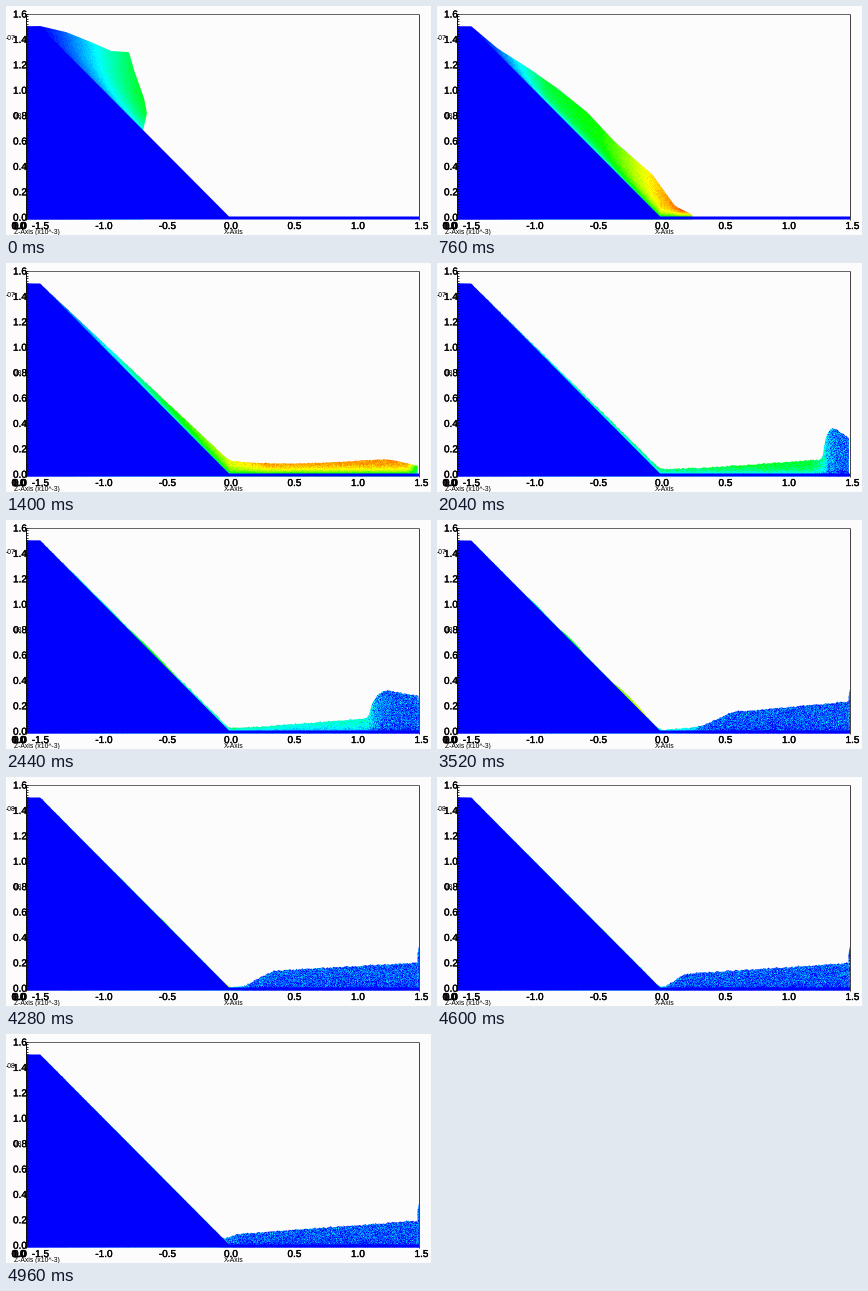
A matplotlib script that plays this animation: 425 px wide and 229 px high, repeating every 5000 ms.

```python
import numpy as np
import matplotlib.pyplot as plt
from matplotlib.animation import FuncAnimation
from matplotlib.colors import LinearSegmentedColormap
from matplotlib.path import Path
from matplotlib.patheffects import withStroke

W, H, DPI = 425, 229, 100
FRAMES, STEP = 125, 40
LEFT, RIGHT, TOP, FLOOR, BASE = 20, 413.5, 7.5, 210.5, 213.5
CREST, TOE, WALL = 34, 223, 413
SLIDE, HIT = .76, 1.36  # the front reaches the floor, then the right wall

# Surface at the start and at the end of the slide.
heap = np.array([(34, 20), (60, 26), (85, 36), (105, 45), (123, 46),
                 (128, 64), (138, 92), (141, 107), (137, 125)], float)
spill = np.array([(34, 20), (60, 42), (90, 61), (120, 82), (150, 106),
                  (178, 136), (215, 168), (238, 200), (256, 209)], float)

# The wave thrown back by the wall: place of its front, its width and
# overhang, and the water level at the front and at the wall.
wave_t = [HIT, 2.04, 2.8, 3.52, 4.28, 4.96]
wave = {
    "front": [413, 384, 340, 256, 234, 213],
    "width": [6, 12, 24, 45, 38, 16],
    "lean": [0, 2, 5, 0, 0, 0],
    "level": [10, 55, 33, 15, 15, 9],
    "wall": [10, 34, 35, 29, 25, 24],
}


def px(size):
    return size * 72 / DPI


def ease(u):
    u = np.clip(u, 0, 1)
    return u * u * (3 - 2 * u)


def mix(a, b, u):
    return a + (b - a) * u


def ground(x):
    return np.minimum(20.5 + (x - CREST) * (FLOOR - 20.5) / (TOE - CREST), FLOOR)


def slide_share(t):
    """Progress of the slide under constant acceleration."""
    return min(1, (132 * t + 87 * t * t) / (132 * SLIDE + 87 * SLIDE ** 2))


def wave_at(t):
    return {name: np.interp(t, wave_t, keys) for name, keys in wave.items()}


def stream(x, t):
    """Depth of the water running down the hill and along the floor."""
    k = 14 * np.exp((HIT - t) / .6)
    tip = spill[-1, 0] + 262 * (t - SLIDE)
    hill = k * (x - CREST) / (TOE - CREST)
    flat = k * np.exp((TOE - x) / 60) + 13 * np.clip((x - TOE) / 150, 0, 1)
    depth = np.where(x < TOE, hill, flat) * np.sqrt(np.clip((tip - x) / 40, 0, 1))
    early = ground(x) - np.interp(x, *spill.T, right=FLOOR)
    return mix(early, depth, ease((t - SLIDE) / (HIT - SLIDE)))


def surface(t):
    if t < SLIDE:
        return mix(heap, spill, slide_share(t))
    x = np.linspace(CREST, min(WALL, spill[-1, 0] + 262 * (t - SLIDE)), 300)
    y = ground(x) - stream(x, t)
    if t > HIT:
        w = wave_at(t)
        s = ease((x - w["front"]) / w["width"])
        far = np.clip((x - w["front"]) / (WALL + 1 - w["front"]), 0, 1)
        y = mix(y, FLOOR - mix(w["level"], w["wall"], far), s)
        x = x - w["lean"] * np.sin(np.pi * s)
    return np.column_stack([x, y])


def body_path(t, rng):
    pts = surface(t)
    dist = np.r_[0, np.cumsum(np.hypot(*np.diff(pts, axis=0).T))]
    at = np.linspace(0, dist[-1], 400)
    x, y = (np.convolve(np.pad(np.interp(at, dist, v), 4, mode="edge"), np.ones(9) / 9, "valid")
            for v in pts.T)
    y = y + rng.normal(0, .4, y.size) * ease((t - SLIDE) / 1.2)
    x = np.r_[x, x[-1], LEFT, LEFT]
    y = np.r_[y, BASE, BASE, 20.5]
    return Path(np.column_stack([x, y]))


def film_path(t):
    """Patches creeping down the drained hill, and the splash on the wall."""
    x = np.linspace(CREST, TOE, 190)
    fade = np.clip((5 - t) / 2.2, 0, 1)
    depth = np.zeros_like(x)
    for start in (84, 113, 162):
        centre = start * (1 + .27 * (t - 2.8))
        u = (x - centre) / (.15 * start * fade)
        tall = .026 * start * fade * ease((t - 2.04) / .76)
        depth = np.maximum(depth, tall * np.sqrt(np.clip(1 - u * u, 0, 1)))
    y = ground(x)
    sheet = np.column_stack([np.r_[x, x[::-1]], np.r_[y - depth, y[::-1] + 1]])
    peak = mix(182, 169, ease((t - 2.04) / .76))
    splash = np.array([(411.5, peak + 8), (413, peak), (413, BASE), (411.5, BASE)])
    return Path.make_compound_path(Path(sheet), Path(splash))


col, row = np.meshgrid(np.arange(W) + .5, np.arange(H) + .5)
height = np.clip((ground(col) - row) * np.where(col < TOE, .707, 1), 0, None)


def speed(t):
    """Speed (0 to 1) along x, and the share of calm water behind the wave."""
    x = col[0]
    late = np.interp(x, [40, 85, 110, 165, 205, 232, 246], [0, .28, .45, .52, .73, .85, 1])
    if t < SLIDE:
        return mix(np.clip((x - 36) / 210, 0, .5), late, slide_share(t)), 0 * x
    run = np.minimum(x / 300, np.interp(t, [HIT, 2.04], [.9, .47]))
    run *= 1 - .6 * ease((t - 2.04) / .76) * np.clip((x - 230) / 60, 0, 1)
    run = mix(late, run, ease((t - SLIDE) / (HIT - SLIDE)))
    front = wave_at(t)["front"]
    calm = ease((x - front + 12) / 22) * (t > HIT)
    pool = .09 + .2 * np.exp(-abs(x - front) / 8)
    return mix(run, pool, calm), calm


fig = plt.figure(figsize=(W / DPI, H / DPI), dpi=DPI, facecolor="#fdfcfd")
ax = fig.add_axes([0, 0, 1, 1])
ax.axis("off")

rainbow = LinearSegmentedColormap.from_list("speed", ["blue", "cyan", "lime", "yellow", "red"])


def layer(z):
    return ax.imshow(np.zeros((H, W)), cmap=rainbow, vmin=0, vmax=1, zorder=z,
                     extent=(0, W, H, 0), interpolation="nearest", aspect="auto")


body, film = layer(1), layer(2)
ax.set_xlim(0, W)
ax.set_ylim(H, 0)

hill = [(LEFT, 20.5), (CREST, 20.5), (TOE, FLOOR), (RIGHT, FLOOR), (RIGHT, BASE), (LEFT, BASE)]
ax.add_patch(plt.Polygon(hill, fc="blue", ec="none", zorder=3))


def rule(x, y, width=1, color="#101010"):
    ax.plot(x, y, color=color, lw=px(width), zorder=4, solid_capstyle="butt")


def label(x, y, text, size=10, ha="center"):
    bold = [withStroke(linewidth=px(.35), foreground="black")] if size > 8 else []
    return ax.text(x, y, text, fontsize=px(size), family="Liberation Sans", color="black",
                   ha=ha, va="center_baseline", zorder=5, path_effects=bold)


rule([LEFT, RIGHT], [TOP, TOP], color="#666666")
rule([RIGHT, RIGHT], [TOP, BASE], color="#444444")
rule([LEFT + .5, LEFT + .5], [TOP, BASE])
for y in np.arange(TOP, FLOOR, 2.54):
    rule([LEFT, LEFT + 2], [y, y], .8)

for k in range(9):
    label(21, 210.7 - 25.4 * k, f"{.2 * k:.1f}", ha="right")
label(7, 109, "0.8", 6.8, "left")
for x, text in ((19.5, "0.0"), (20.3, "1.0"), (21, "0.0")):
    label(x, 219, text, ha="right")
for k in range(-3, 4):
    label(225 + 63.5 * k, 219, f"{.5 * k:.1f}")
label(8, 225.7, "Z-Axis (x10^-3)", 6.8, "left")
label(218, 225.7, "X-Axis", 6.8, "left")
power = label(0, 31, "-07", 6.8, "left")


def draw(i):
    t = i * STEP / 1000
    rng = np.random.default_rng(100 + i)
    along, calm = speed(t)
    rough = .01 + .02 * ease(t / 2.4) + .025 * calm
    grain = rng.normal(0, 1, (H, W)) * rough
    reach = mix(9, 4, ease(t / SLIDE))
    body.set_data(np.clip(along * (1 - .45 * np.exp(-height / reach)) + grain, 0, 1))
    film.set_data(np.clip(np.where(col < TOE, col / 300, along) + grain, 0, 1))
    body.set_clip_path(body_path(t, rng), ax.transData)
    film.set_clip_path(film_path(t), ax.transData)
    film.set_visible(t > 2.04)
    power.set_text("-07" if t < 4 else "-08.")
    return body, film, power


anim = FuncAnimation(fig, draw, frames=FRAMES, interval=STEP, repeat=True, repeat_delay=0)
plt.show()
```
